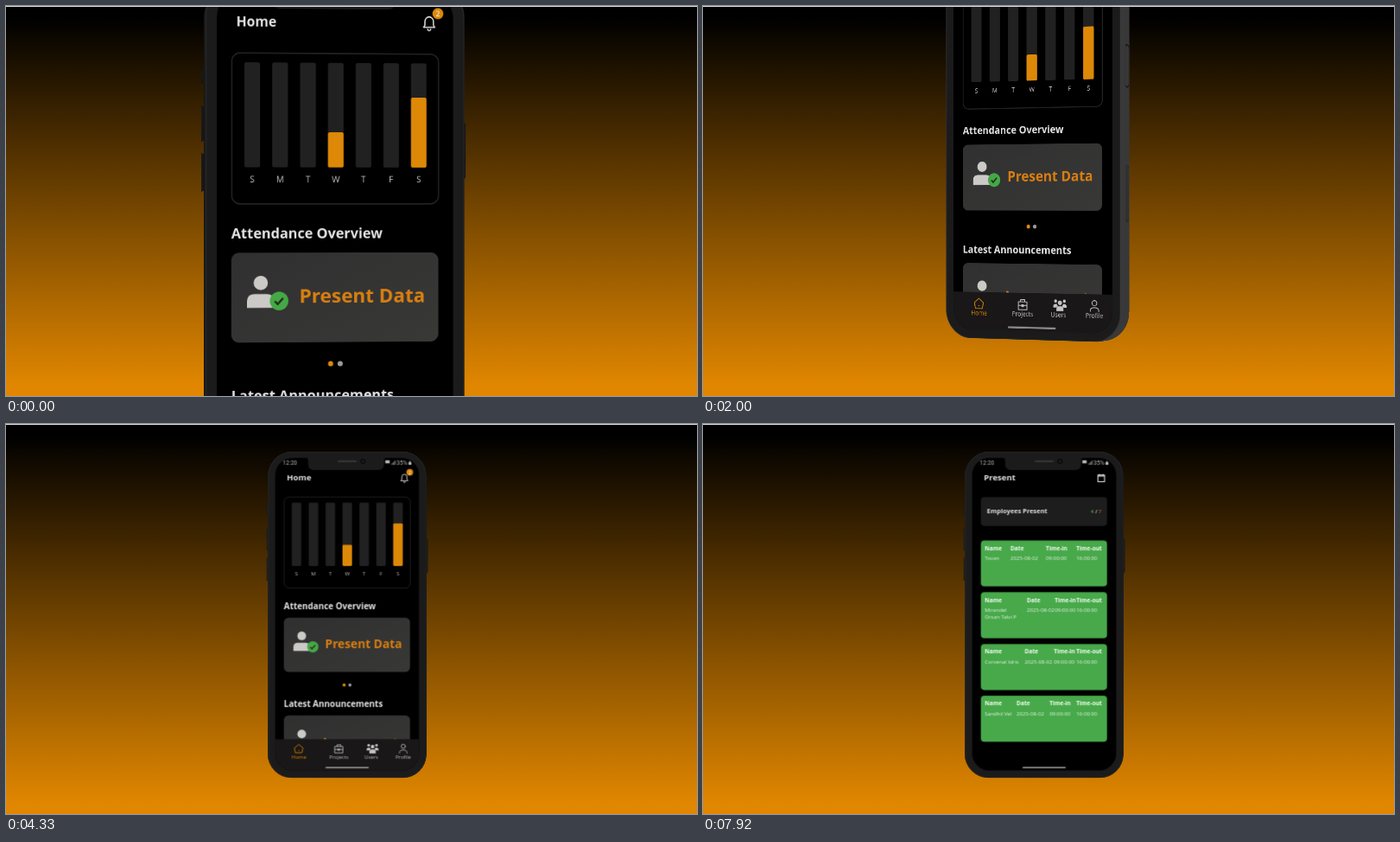
Write an HTML page that moves like this. It is 800x451 px and loops after 8000 ms.

```html
<!DOCTYPE html>
<html lang="en">
<head>
<meta charset="utf-8">
<title>Attendance app</title>
<style>
  html, body { margin: 0; width: 100%; height: 100%; overflow: hidden; background: #000; }
  #stage {
    position: relative; width: 800px; height: 451px; overflow: hidden;
    background: linear-gradient(#000 3%, #e08600 97%);
    perspective: 2600px; perspective-origin: 400px 225px;
  }
  #stage::after { content: ""; position: absolute; inset: 0 0 auto; height: 1px; background: #ddd; }
  /* The phone is laid out at double size and scaled down by its pose. */
  #phone {
    position: absolute; left: -182px; top: -375px; width: 364px; height: 750px;
    transform-style: preserve-3d;
  }
  .slice, .face { position: absolute; inset: 0; border-radius: 54px; }
  .slice { background: var(--rim); }
  .knob { position: absolute; width: 8px; border-radius: 3px; background: var(--rim); }
  .face, .side, .side svg { backface-visibility: hidden; }
  .front { transform: translateZ(20.4px); }
  .back { transform: rotateY(180deg) translateZ(20.4px); }
  .side {
    position: absolute; left: 162px; top: 54px; width: 40px; height: 642px;
    background: var(--rim); transform-style: preserve-3d;
  }
  .side svg { transform: translateZ(4px); }
  .left { transform: rotateY(-90deg) translateZ(182.4px); }
  .right { transform: rotateY(90deg) translateZ(182.4px); }
  svg { display: block; width: 100%; height: 100%; }
  text { font-family: "Open Sans", "Noto Sans", sans-serif; fill: #e4e4e4; }
  .title { font-size: 9.5px; font-weight: 700; }
  .heading { font-size: 9.85px; font-weight: 700; }
  .offer { font-size: 13.7px; font-weight: 700; fill: #d97f10; }
  .small { font-size: 6px; fill: #c4c4c4; }
  .status { font: 6.6px Roboto, sans-serif; fill: #bbb; }
  .mid { text-anchor: middle; }
  .column { font-size: 6.6px; font-weight: 700; fill: #f4fff4; }
  .value { font-size: 6.1px; fill: #e6f6e6; }
  .line { fill: none; stroke: #c4c4c4; stroke-width: .8; stroke-linejoin: round; stroke-linecap: round; }
</style>
</head>
<body>
<div id="stage">
  <div id="phone">
    <div class="face front">
      <svg viewBox="304 33 182 375">
        <defs>
          <clipPath id="screen"><rect x="312" y="40" width="166" height="360" rx="20"/></clipPath>
          <linearGradient id="panel" x2="1" y2="1">
            <stop stop-color="#303030"/><stop offset="1" stop-color="#383837"/>
          </linearGradient>
        </defs>
        <rect x="304.4" y="33.4" width="181.2" height="374.2" rx="26.6" fill="#1b1b1c" stroke="#272728" stroke-width=".8"/>
        <g clip-path="url(#screen)">
          <path d="M312 40h166v360h-166z"/>
          <g id="home">
            <text class="title" x="325.5" y="66.3">Home</text>
            <path class="line" style="stroke:#eee" d="M457 66.2h8l-1-1.5V62a3 3.2 0 0 0-6 0v2.7zM460 67.4a1 1 0 0 0 2 0"/>
            <circle cx="467.2" cy="56.5" r="3.9" fill="#dd8807"/>
            <text class="mid" x="467.2" y="58.5" font-size="5.4" font-weight="600">2</text>
            <rect x="322.3" y="85" width="145.4" height="105" rx="6" fill="none" stroke="#2c2c2c" stroke-width=".7"/>
            <g id="chart"></g>
            <text class="heading" x="322" y="214">Attendance Overview</text>
            <rect x="322" y="224" width="145.5" height="62.5" rx="5.5" fill="url(#panel)"/>
            <g fill="#cbcac7">
              <circle cx="342.6" cy="245" r="5"/>
              <path d="M333 262.4v-4.6q0-5 5.2-5h8.6q5 0 5 5v4.6z"/>
            </g>
            <circle cx="355.4" cy="257.6" r="6.5" fill="#45a845"/>
            <path d="M352.4 257.8l2 2 3.8-4.2" fill="none" stroke="#222d22" stroke-width="1.4"/>
            <text class="offer" x="369.5" y="259">Present Data</text>
            <circle cx="391.5" cy="301.6" r="1.8" fill="#dd8807"/>
            <circle cx="398.2" cy="301.6" r="1.8" fill="#999"/>
            <text class="heading" x="322" y="327">Latest Announcements</text>
            <rect x="322" y="336.5" width="145.5" height="62.5" rx="5.5" fill="url(#panel)"/>
            <circle cx="342.6" cy="358" r="5" fill="#cbcac7"/>
            <text class="offer" x="365.5" y="371" style="font-size:11.4px">Announcements</text>
            <path d="M312 364h166v36h-166z" fill="#191717"/>
            <path class="line" style="stroke:#dd8807" d="M334.4 374l4.8-4 4.8 4-1.2 5.6h-7.2zM339.2 376.8v.4"/>
            <path class="line" d="M381 372.4h9v7.4h-9zM383.4 372.2v-1.8h4.2v1.8M381 375.8h9M384.6 375.2h1.8v1.6h-1.8z"/>
            <g fill="#c4c4c4">
              <circle cx="419.8" cy="371" r="1.5"/><circle cx="428.8" cy="371" r="1.5"/>
              <circle cx="424.3" cy="372.6" r="2.1"/>
              <path d="M417.4 377v-1.4q0-2 3.4-2l1.4 2-1.6 1.4zM431.2 377v-1.4q0-2-3.4-2l-1.4 2 1.6 1.4zM420.6 380.4v-2q0-2.8 3.7-2.8t3.7 2.8v2z"/>
            </g>
            <circle class="line" cx="459.7" cy="372.2" r="2.4"/>
            <path class="line" d="M455.4 380v-.8q0-2.8 4.3-2.8t4.3 2.8v.8"/>
            <g class="mid">
              <text class="small" x="339.4" y="386.2" style="fill:#dd8807">Home</text>
              <text class="small" x="385.5" y="386.2">Projects</text>
              <text class="small" x="422.8" y="386.2">Users</text>
              <text class="small" x="459.6" y="386.2">Profile</text>
            </g>
          </g>
          <g id="present">
            <path d="M312 40h166v360h-166z"/>
            <text class="title" x="325.5" y="66.3">Present</text>
            <path class="line" style="stroke:#eee;stroke-width:1" d="M457 59.6h7.6v7.8H457zM457 61h7.6M458.8 58.8v.8M462.8 58.8v.8"/>
            <rect x="322" y="85" width="145.5" height="33.3" rx="4" fill="#1d1d1d"/>
            <text x="329" y="104.2" font-size="7.4" font-weight="700">Employees Present</text>
            <text x="448.8" y="103.7" font-size="6" font-weight="600"><tspan id="count" fill="#45a845">0</tspan> / <tspan fill="#b85a20">7</tspan></text>
            <g id="list"></g>
          </g>
          <path d="M346 39.5q4 0 4 4v4q0 6.5 6.5 6.5h74.5q6.5 0 6.5-6.5v-4q0-4 4-4z" fill="#1b1b1c"/>
          <text class="status" x="320.8" y="48">12:20</text>
          <path d="M439 42.8h5v3.4h-5zM440 46.2l2.4 2" fill="#bbb"/>
          <path d="M446.4 48v-1.6M447.8 48v-2.8M449.2 48v-4M450.4 48v-5.2" stroke="#999" stroke-width=".8"/>
          <text class="status" x="452" y="48">35%</text>
          <path d="M465.8 48v-3h.8v-1.4h1.6V45h.8v3z" fill="#bbb"/>
          <rect x="370" y="395.8" width="50" height="1.7" rx=".8" fill="#8a8a8a"/>
        </g>
        <rect x="384" y="42.8" width="22" height="2.2" rx="1.1" fill="#343436"/>
        <circle cx="413.3" cy="44" r="3" fill="#0b0b10"/>
        <circle cx="413.3" cy="44" r="1.2" fill="#23232c"/>
      </svg>
    </div>
    <div class="face back">
      <svg viewBox="0 0 182 375">
        <defs>
          <linearGradient id="glass" x2="0" y2="1">
            <stop stop-color="#505051"/><stop offset=".5" stop-color="#5c5b5a"/><stop offset="1" stop-color="#4c4b4a"/>
          </linearGradient>
        </defs>
        <rect x="1" y="1" width="180" height="373" rx="26" fill="url(#glass)" stroke="#2a2a2a" stroke-width="2"/>
        <rect x="9" y="9" width="84" height="85" rx="21" fill="#474748" stroke="#2a2a2a" stroke-width="2"/>
        <g id="lenses"></g>
        <circle cx="91" cy="183" r="20" fill="#99989f"/>
      </svg>
    </div>
    <div class="side left"><svg viewBox="0 60 20 321"></svg></div>
    <div class="side right"><svg viewBox="0 60 20 321">
      <rect x="6" y="244" width="8" height="53" rx="4" fill="#0002" stroke="#0005" stroke-width=".6"/>
    </svg></div>
  </div>
</div>
<script>
  const $ = selector => document.querySelector(selector);
  const add = (selector, html) => $(selector).insertAdjacentHTML('beforeend', html);
  const phone = $('#phone');

  // Body: stacked slices, the middle ones carrying the buttons [top, bottom].
  const buttons = { left: [[95, 105], [122, 146], [155, 181]], right: [[133, 172]] };
  let knobs = '';
  for (const [edge, spans] of Object.entries(buttons)) {
    for (const [top, bottom] of spans) {
      const height = bottom - top;
      knobs += `<div class="knob" style="${edge}:-4px;top:${(top - 33) * 2}px;height:${height * 2}px"></div>`;
      add(`.side.${edge} svg`,
        `<rect x="6" y="${top}" width="8" height="${height}" rx="3" fill="none" stroke="#000a" stroke-width="1.2"/>`);
    }
  }
  for (let z = -20; z <= 20; z += 2) {
    phone.insertAdjacentHTML('afterbegin',
      `<div class="slice" style="transform:translateZ(${z}px)">${Math.abs(z) <= 8 ? knobs : ''}</div>`);
  }

  for (const [x, y] of [[38, 31], [68, 53], [38, 72]]) {
    add('#lenses', `<circle cx="${x}" cy="${y}" r="16" fill="#1c1c1d" stroke="#858585" stroke-width="2"/>
      <circle cx="${x}" cy="${y}" r="10" fill="#77777a"/>`);
  }

  const bar = (x, height, color) =>
    `<rect x="${x - 5.5}" y="${164.5 - height}" width="11" height="${height}" rx="1.4" fill="${color}"/>`;
  const filled = { 3: 24.5, 6: 49 };
  [...'SMTWTFS'].forEach((day, i) => {
    const x = 336.6 + 19.5 * i;
    add('#chart', bar(x, 73, '#212121') + (filled[i] ? bar(x, filled[i], '#dd8807') : '') +
      `<text class="small mid" x="${x}" y="175.2">${day}</text>`);
  });

  const people = [
    { name: ['Tovan'], date: 356, timeIn: 397 },
    { name: ['Mirandel', 'Orsan Talvi P'], date: 375, timeIn: 407 },
    { name: ['Corvenal Idris'], date: 372.5, timeIn: 406 },
    { name: ['Sandhil Vel'], date: 363, timeIn: 401 }
  ];
  people.forEach(({ name, date, timeIn }, i) => {
    const y = 135 + 59.65 * i;
    const column = (x, label, ...lines) =>
      `<text class="column" x="${x}" y="${y + 11.2}">${label}</text>` +
      lines.map((line, n) => `<text class="value" x="${x}" y="${y + 22.4 + 8.6 * n}">${line}</text>`).join('');
    add('#list', `<rect x="322" y="${y}" width="145.5" height="53" rx="4" fill="#48a94a"/>` +
      column(326.5, 'Name', ...name) + column(date, 'Date', '2025-08-02') +
      column(timeIn, 'Time-in', '09:00:00') + column(432, 'Time-out', '16:00:00'));
  });

  // Camera move: time, centre x, centre y, scale, turn in degrees, rim brightness.
  const poses = [
    [0, 380, 279, 1.645, 6, 22],
    [917, 382.3, 386.3, 1.815, 25, 40],
    [2000, 386, 155.6, 1.226, -25.4, 56],
    [3083, 404.3, 208, .94, -102.8, 22],
    [4250, 395, 220.5, 1, -360, 30]
  ];
  const slope = (i, k) => (poses[i + 1][k] - poses[i][k]) / (poses[i + 1][0] - poses[i][0]);
  function tangent(i, k) {
    if (i === 0) return slope(0, k);
    if (i === poses.length - 1) return 0;
    const a = slope(i - 1, k), b = slope(i, k);
    return a * b > 0 ? 2 * a * b / (a + b) : 0;
  }
  function poseAt(t) {
    const last = poses.length - 1;
    if (t >= poses[last][0]) return poses[last].slice(1);
    const i = poses.findIndex((pose, n) => t < poses[n + 1][0]);
    const span = poses[i + 1][0] - poses[i][0];
    const u = (t - poses[i][0]) / span, v = 1 - u;
    return [1, 2, 3, 4, 5].map(k =>
      v * v * (1 + 2 * u) * poses[i][k] + u * u * (3 - 2 * u) * poses[i + 1][k] +
      span * u * v * (v * tangent(i, k) - u * tangent(i + 1, k)));
  }

  const LOOP = 8000, STEP = 1000 / 12, OPEN_PAGE = 5500, SHOW_LIST = 6700;
  function draw() {
    const t = Math.floor((performance.now() % LOOP + 4) / STEP) * STEP % LOOP;
    const [x, y, scale, turn, rim] = poseAt(t);
    const s = scale / 2;
    phone.style.transform = `translate3d(${x}px, ${y}px, 0) rotateY(${turn}deg) scale3d(${s}, ${s}, ${s})`;
    phone.style.setProperty('--rim', `rgb(${rim}, ${rim}, ${rim + 1})`);
    $('#present').style.opacity = Math.min(1, Math.max(0, (t - OPEN_PAGE) / 250));
    const loaded = t >= SHOW_LIST;
    $('#list').style.display = loaded ? '' : 'none';
    $('#count').textContent = loaded ? people.length : 0;
    requestAnimationFrame(draw);
  }
  draw();
</script>
</body>
</html>
```
